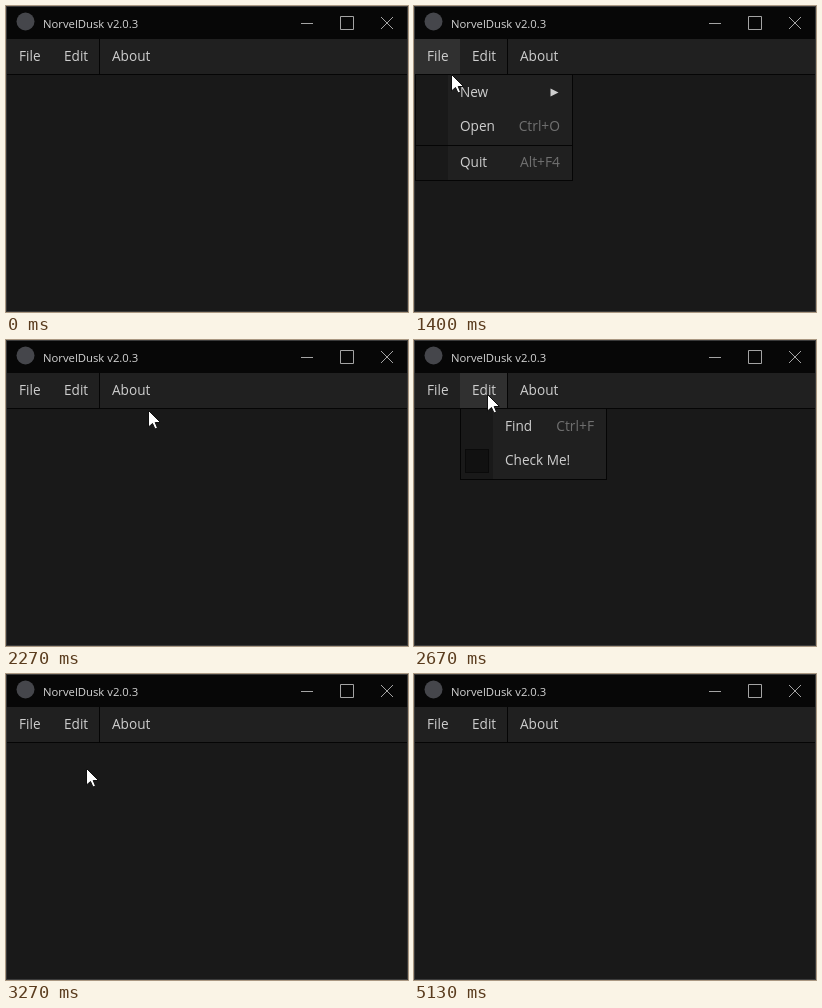
Recreate the animation shown at these times as an HTML page with a canvas. Size 402 by 306 pixels, loop 5.34 s.

```html
<!DOCTYPE html>
<html lang="en">
<head>
<meta charset="utf-8">
<title>Dark menu</title>
<style>
  html, body { margin: 0; width: 100%; height: 100%; overflow: hidden; background: #191919; }
  canvas { display: block; }
</style>
</head>
<body>
<canvas id="stage" width="402" height="306"></canvas>
<script>
const g = document.getElementById('stage').getContext('2d');
const LOOP = 5340, TICK = 1000 / 15;
const FONT = '"Open Sans", "Noto Sans", sans-serif';
const TEXT = '#cecece', DIM = '#707070', LINE = '#050505';
const BAR = '#202020', BODY = '#191919', HOVER = '#303030';
const TOP = 69, ROW = 34.6, GUTTER = 32, PAD = 12;

// Places where the pointer rests, with the ticks it arrives and leaves
const stop = (x, y, arrive, leave) => ({ x, y, arrive, leave });
const enter = stop(5, 54, 13, 13);
const file = stop(26, 59, 16, 19);
const add = stop(58, 85, 24, 24);
const project = stop(210, 86, 29, 31);
const edit = stop(73, 54, 37, 41);
const check = stop(84, 116, 45, 47);
const again = { ...edit, arrive: 52, leave: 56 };
const about = stop(115, 54, 61, 70);
const exit = stop(40, 300, 74, 77);
const route = [enter, file, add, project, edit, check, again, about, exit];

const tabs = ['File', 'Edit', 'About'], tabEdges = [1, 46, 94, 157];

// Items are "label|shortcut"; an empty item is a separator
const fileMenu = { x: 1, right: 158, items: ['New', 'Open|Ctrl+O', '', 'Quit|Alt+F4'] };
const newMenu = { x: 158, right: 357, items: ['Project|Ctrl+Shift+P', 'File|Ctrl+Shift+F', 'Folder|Ctrl+Shift+O'] };
const editMenu = { x: 46, right: 192, items: ['Find|Ctrl+F', 'Check Me!'] };

const within = (v, a, b) => v >= a && v < b;

function rect(x, y, w, h, color) {
  g.fillStyle = color;
  g.fillRect(x, y, w, h);
}

function text(str, x, y, color = TEXT, size = 13.6, align = 'left') {
  g.font = `${size}px ${FONT}`;
  g.textAlign = align;
  g.fillStyle = color;
  g.fillText(str, x, y);
}

function shape(d, fill, stroke, width = 1) {
  const p = new Path2D(d);
  if (fill) { g.fillStyle = fill; g.fill(p); }
  if (stroke) { g.strokeStyle = stroke; g.lineWidth = width; g.stroke(p); }
}

function pointer(k) {
  if (!within(k, enter.arrive, exit.leave)) return null;
  const i = route.findLastIndex(s => s.arrive <= k);
  const a = route[i], b = route[i + 1];
  if (!b || k <= a.leave) return a;
  const u = (k - a.leave) / (b.arrive - a.leave), e = u * u * (3 - 2 * u);
  return { x: Math.round(a.x + (b.x - a.x) * e), y: Math.round(a.y + (b.y - a.y) * e) };
}

function drawWindow() {
  rect(0, 0, 402, 306, '#3b3b3b');
  rect(1, 1, 400, 32, '#070707');
  rect(1, 33, 400, 35, BAR);
  rect(1, 68, 400, 1, LINE);
  rect(1, TOP, 400, 236, BODY);
  g.fillStyle = '#45464b';
  g.beginPath();
  g.arc(19.5, 15.5, 9, 0, 7);
  g.fill();
  text('NorvelDusk v2.0.3', 37, 22, '#d4d4d4', 11.3);
  shape('M295 17.5h12M334.5 10.5h13v13h-13zM375 11l12 12M387 11l-12 12', null, '#a4a4a4');
}

function drawTabs(at, open, pressed) {
  tabs.forEach((label, i) => {
    const x = tabEdges[i], end = tabEdges[i + 1];
    const over = at && within(at.y, 33, 68) && within(at.x, x, end);
    if (over || open === label) rect(x, 33, end - x, 35, pressed === label ? BODY : HOVER);
    text(label, x + PAD, 55);
  });
  rect(93, 33, 1, 35, LINE);
}

function drawMenu({ x, right, items }, at, active) {
  const rows = items.filter(Boolean).length;
  const height = rows * ROW + items.length - rows;
  rect(x, TOP - 1, right - x + 1, Math.ceil(height) + 2, LINE);
  let top = TOP;
  for (const item of items) {
    if (!item) { top++; continue; }
    const [label, key] = item.split('|');
    const y = Math.ceil(top), h = Math.ceil(top + ROW) - y, base = Math.floor(top) + 22;
    const over = label === active || within(at.x, x, right) && at.y > TOP && within(at.y, y, y + h);
    rect(x + 1, y, GUTTER, h, over ? '#262626' : BODY);
    rect(x + 1 + GUTTER, y, right - x - 1 - GUTTER, h, over ? HOVER : BAR);
    text(label, x + 1 + GUTTER + PAD, base);
    if (key) text(key, right - PAD, base, DIM, 13.8, 'right');
    top += ROW;
  }
}

function drawCheck(checked) {
  rect(51, 109, 24, 24, '#0a0a0a');
  rect(52, 110, 22, 22, '#111');
  if (checked) shape('M57 121l4 5 8-10', null, TEXT, 2);
}

function drawPointer({ x, y }) {
  g.save();
  g.translate(x + .5, y + .5);
  shape('M0 0V16.5L4 13 6.5 18.5 9 17.5 6.7 12H12Z', '#fff', '#111');
  g.restore();
}

function draw(k) {
  const at = pointer(k);
  const fileOpen = within(k, file.leave, project.leave);
  const newOpen = within(k, add.arrive, project.leave);
  const checked = within(k, again.arrive + 1, again.leave);
  const editOpen = checked || within(k, edit.arrive + 1, check.leave);
  const pressed = within(k, about.arrive + 4, about.arrive + 6);

  drawWindow();
  drawTabs(at, fileOpen ? 'File' : editOpen && 'Edit', pressed && 'About');
  if (fileOpen) {
    drawMenu(fileMenu, at, newOpen && 'New');
    shape('M136.5 82.5l8 4-8 4z', TEXT);
  }
  if (newOpen) drawMenu(newMenu, at);
  if (editOpen) {
    drawMenu(editMenu, at);
    drawCheck(checked);
  }
  if (at) drawPointer(at);
}

function frame(now) {
  draw(Math.floor((now % LOOP + 4) / TICK));
  requestAnimationFrame(frame);
}
requestAnimationFrame(frame);
</script>
</body>
</html>
```
